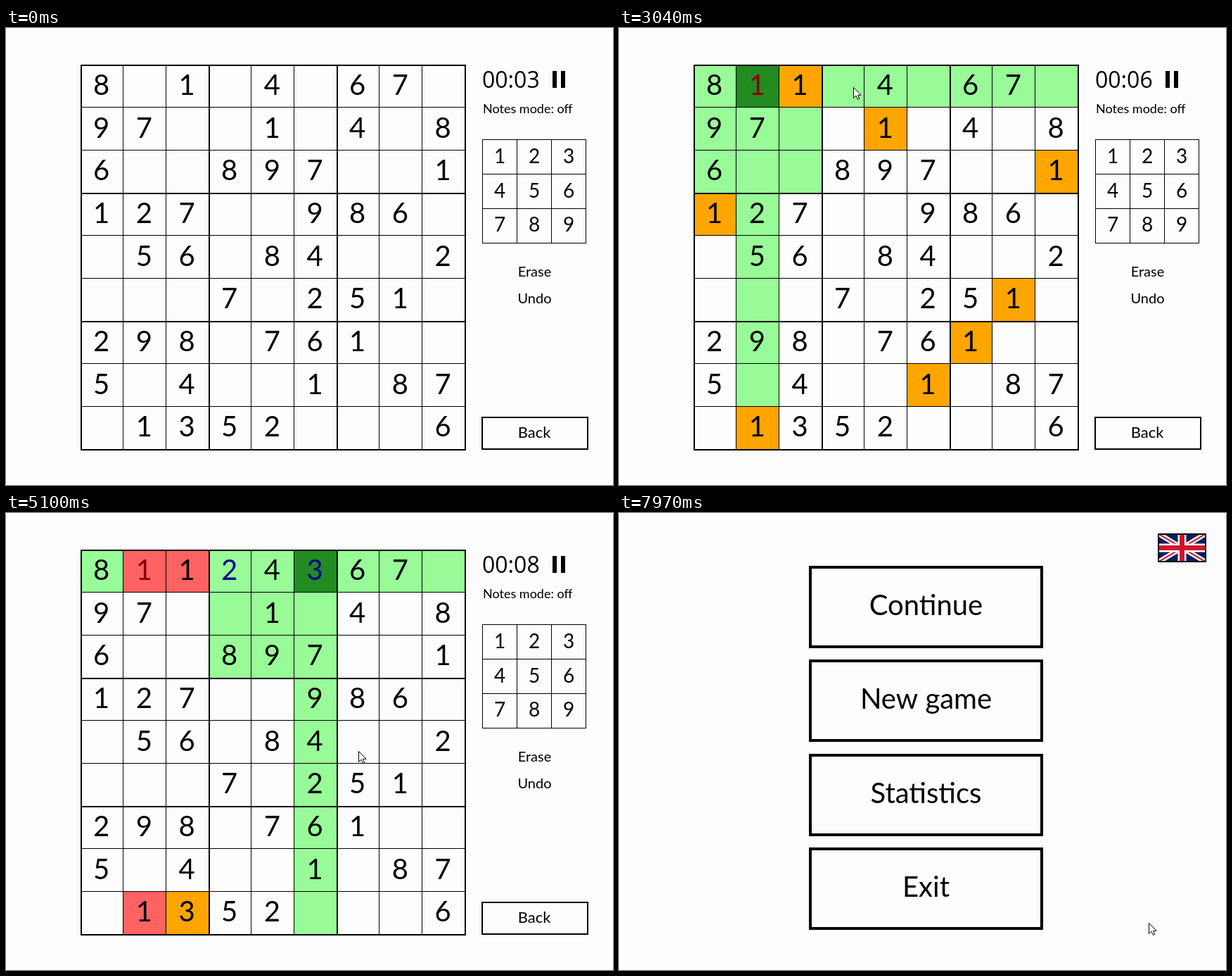
Animation, 863 px wide and 649 px high, one loop 8 s. Source, as an HTML page with a canvas:

```html
<!DOCTYPE html>
<html lang="en">
<head>
<meta charset="utf-8">
<title>Sudoku</title>
<style>
  html, body { margin: 0; width: 100%; height: 100%; overflow: hidden; background: #fdfdfd; }
  canvas { display: block; }
</style>
</head>
<body>
<canvas id="stage" width="863" height="649"></canvas>
<script>
const ctx = document.getElementById('stage').getContext('2d');
const LOOP = 8000, MENU_AT = 7690, FIRST_TICK = 800;
const LEFT = 106, TOP = 52, CELL = 182 / 3;
const lato = size => `${size}px Lato, sans-serif`;

const puzzle = [
  '8.1.4.67.', '97..1.4.8', '6..897..1',
  '127..986.', '.56.84..2', '...7.251.',
  '298.761..', '5.4..1.87', '.1352...6'
];

// Player actions: select a column of the top row, or type into it
const actions = [
  { at: 900, select: 1 }, { at: 1900, type: '1' },
  { at: 3250, select: 3 }, { at: 3700, type: '2' },
  { at: 4400, select: 5 }, { at: 4800, type: '3' },
  { at: 5950, select: null }
];

// Pointer path: time, x, y
const path = [
  [250, 430, 590], [800, 201, 82], [2600, 201, 82], [3000, 333, 84],
  [3850, 333, 84], [4200, 447, 76], [4850, 447, 76], [5100, 501, 338],
  [5750, 681, 367], [6600, 681, 367], [7300, 753, 582], [LOOP, 753, 582]
];

function stateAt(time) {
  const grid = puzzle.map(row => [...row]);
  let selected = null;
  for (const action of actions) {
    if (action.at > time) break;
    if (action.type) grid[0][selected] = action.type;
    else selected = action.select;
  }
  return { grid, selected };
}

const sameBox = (r1, c1, r2, c2) =>
  Math.floor(r1 / 3) === Math.floor(r2 / 3) && Math.floor(c1 / 3) === Math.floor(c2 / 3);

const sees = (r1, c1, r2, c2) => r1 === r2 || c1 === c2 || sameBox(r1, c1, r2, c2);

function inConflict(grid, r, c) {
  return grid[r][c] !== '.' && grid.some((row, y) => row.some((digit, x) =>
    (x !== c || y !== r) && digit === grid[r][c] && sees(r, c, y, x)));
}

function cellColor({ grid, selected }, r, c) {
  if (selected !== null) {
    if (r === 0 && c === selected) return '#228b22';
    const digit = grid[0][selected];
    if (digit !== '.' && digit === grid[r][c]) return '#ffa500';
  }
  if (inConflict(grid, r, c)) return '#ff6262';
  if (selected !== null && sees(0, selected, r, c)) return '#98fb98';
  return null;
}

function text(value, x, y, font, align = 'center', color = '#000') {
  ctx.font = font;
  ctx.textAlign = align;
  ctx.fillStyle = color;
  ctx.fillText(value, x, y);
}

function frame(x, y, w, h, width) {
  ctx.strokeStyle = '#000';
  ctx.lineWidth = width;
  ctx.strokeRect(x + width / 2, y + width / 2, w - width, h - width);
}

function lattice(x, y, pitch, count, widthOf) {
  const size = Math.round(pitch * count) + widthOf(0);
  ctx.fillStyle = '#000';
  for (let i = 0; i <= count; i++) {
    const width = widthOf(i), offset = Math.floor(i * pitch + .01);
    ctx.fillRect(x + offset, y, width, size);
    ctx.fillRect(x, y + offset, size, width);
  }
}

function drawBoard(state) {
  for (let r = 0; r < 9; r++) for (let c = 0; c < 9; c++) {
    const fill = cellColor(state, r, c);
    if (fill) {
      ctx.fillStyle = fill;
      ctx.fillRect(Math.floor(LEFT + c * CELL), Math.floor(TOP + r * CELL), 61, 61);
    }
    const digit = state.grid[r][c];
    if (digit === '.') continue;
    const typed = puzzle[r][c] === '.';
    const color = !typed ? '#000' : inConflict(state.grid, r, c) ? '#8b0000' : '#00008b';
    text(digit, 135.7 + c * CELL, 95 + r * CELL, lato(40), 'center', color);
  }
  lattice(LEFT, TOP, CELL, 9, i => i % 3 ? 1 : 2);
}

function drawPanel(time) {
  const seconds = 4 + Math.floor((time - FIRST_TICK) / 1000);
  text('00:' + String(seconds).padStart(2, '0'), 677, 84.5, '500 32px "Open Sans", sans-serif', 'left');
  ctx.fillRect(777, 61, 6, 24);
  ctx.fillRect(789, 61, 6, 24);
  text('Notes mode: off', 678, 121, lato(18), 'left');
  lattice(677, 158, 49, 3, () => 1);
  for (let i = 0; i < 9; i++) {
    text(i + 1, 702 + i % 3 * 49, 192 + Math.floor(i / 3) * 48.7, lato(28));
  }
  text('Erase', 751.5, 352.5, lato(20));
  text('Undo', 751.5, 390.5, lato(20));
  frame(676, 552, 152, 47, 2);
  text('Back', 751, 582, lato(22));
}

function line(x1, y1, x2, y2, color, width) {
  ctx.strokeStyle = color;
  ctx.lineWidth = width;
  ctx.beginPath();
  ctx.moveTo(x1, y1);
  ctx.lineTo(x2, y2);
  ctx.stroke();
}

function drawFlag(x, y, w, h) {
  const cx = x + w / 2, cy = y + h / 2;
  const diagonals = (color, width) => {
    line(x, y, x + w, y + h, color, width);
    line(x, y + h, x + w, y, color, width);
  };
  const cross = (color, width) => {
    line(cx, y, cx, y + h, color, width);
    line(x, cy, x + w, cy, color, width);
  };
  ctx.save();
  ctx.beginPath();
  ctx.rect(x, y, w, h);
  ctx.clip();
  ctx.fillStyle = '#00205f';
  ctx.fillRect(x, y, w, h);
  diagonals('#fff', 7);
  diagonals('#d0142c', 2);
  cross('#fff', 12);
  cross('#d0142c', 7);
  ctx.restore();
  frame(x, y, w, h, 2);
}

function drawMenu() {
  ['Continue', 'New game', 'Statistics', 'Exit'].forEach((label, i) => {
    const y = 75 + i * 133.3;
    frame(270, Math.round(y), 333, 117, 4);
    text(label, 436.5, y + 70, lato(40));
  });
  drawFlag(766, 29, 69, 41);
}

function drawPointer(time) {
  const next = path.findIndex(point => point[0] > time);
  if (next < 1) return;
  const [t1, x1, y1] = path[next - 1], [t2, x2, y2] = path[next];
  const u = (time - t1) / (t2 - t1), ease = u * u * (3 - 2 * u);
  ctx.save();
  ctx.translate(Math.round(x1 + (x2 - x1) * ease) + .5, Math.round(y1 + (y2 - y1) * ease) + .5);
  const arrow = new Path2D('M0 0V15L3.5 11.7L6 17L8.3 16L6 10.8H10.6Z');
  ctx.fillStyle = '#fff';
  ctx.fill(arrow);
  ctx.strokeStyle = '#000';
  ctx.lineWidth = 1;
  ctx.stroke(arrow);
  ctx.restore();
}

function draw(now) {
  const time = now % LOOP;
  ctx.fillStyle = '#fdfdfd';
  ctx.fillRect(0, 0, 863, 649);
  if (time < MENU_AT) {
    drawBoard(stateAt(time));
    drawPanel(time);
  } else {
    drawMenu();
  }
  drawPointer(time);
  requestAnimationFrame(draw);
}

draw(0);
</script>
</body>
</html>
```
